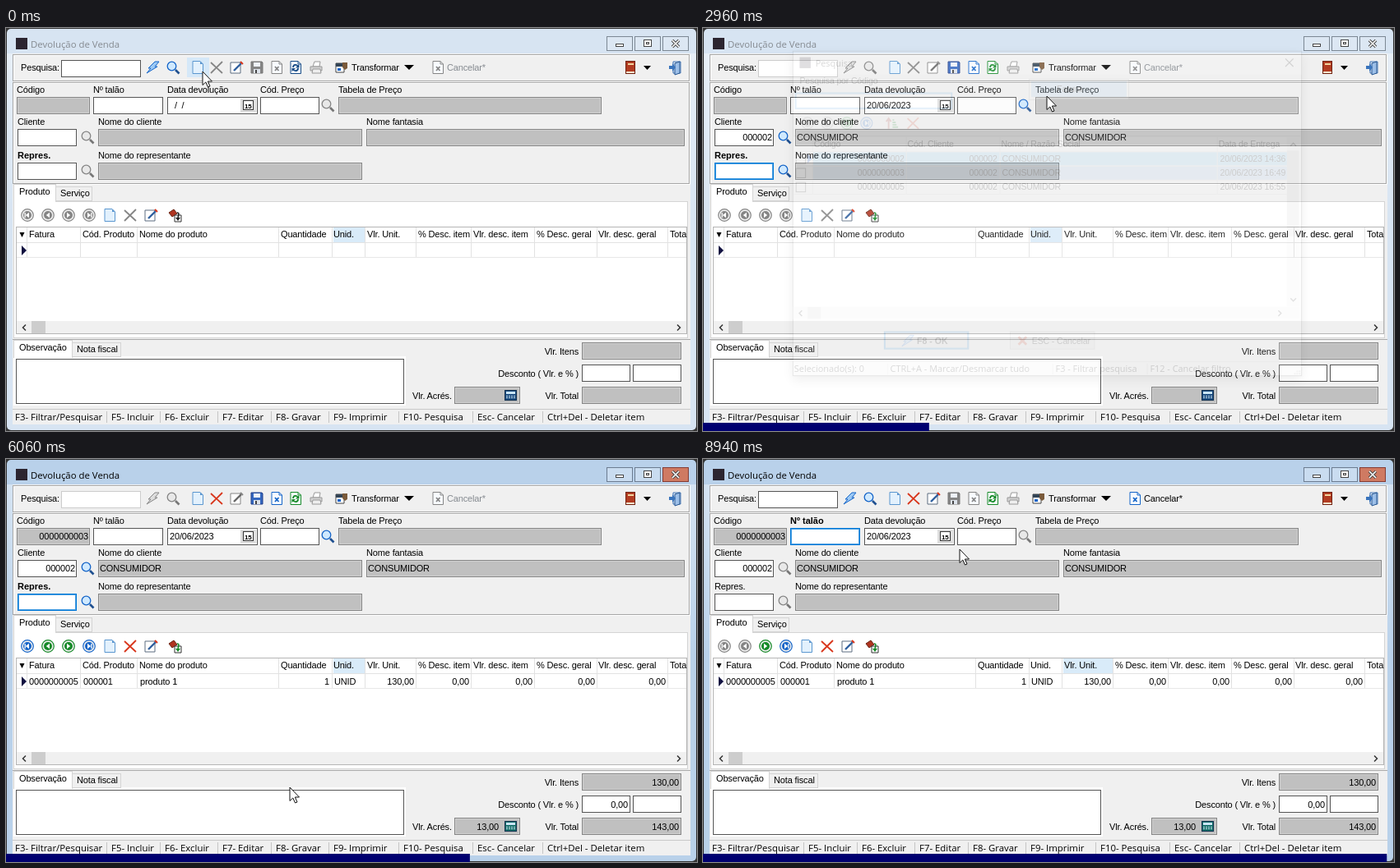
An HTML page for the animation above (9.02 s loop, 840x491 px).

```html
<!DOCTYPE html>
<html lang="pt">
<head>
<meta charset="utf-8">
<title>Devolução de Venda</title>
<style>
html, body { margin: 0; width: 100%; height: 100%; overflow: hidden; background: #f0f0f0; }
svg { display: block; width: 100%; height: 100%; }
text { font: 11px "Liberation Sans", sans-serif; letter-spacing: -.15px; fill: #000; white-space: pre; }
.b { font-weight: bold; letter-spacing: 0; }
.e { text-anchor: end; }
.ui { font: 11.4px "Open Sans", sans-serif; letter-spacing: 0; }
.dim { fill: #858a90; }
#press { mix-blend-mode: multiply; }
</style>
</head>
<body>
<svg id="stage" viewBox="0 0 840 491"></svg>
<script>
const LOOP = 9020;
const NEW = 310, MENU = 1660, PICK = 2870, OPEN = 2920, CHECK = 4150, OK = 5660,
      LOADED = 5820, FOCUS = 6600, SAVE = 8460;
const GREY = '#858585', BLUE = '#1464c8', RED = '#d8361c', GREEN = '#168a28', FACE = '#f0f0f0';

// Drawing helpers
const rect = (x, y, w, h, fill, stroke) => stroke
  ? `<rect x="${x + .5}" y="${y + .5}" width="${w - 1}" height="${h - 1}" fill="${fill}" stroke="${stroke}"/>`
  : `<rect x="${x}" y="${y}" width="${w}" height="${h}" fill="${fill}"/>`;
const text = (x, y, s, cls = '') => `<text x="${x}" y="${y + 4}" class="${cls}">${s}</text>`;
const path = (d, fill, stroke = 'none', width = 1) =>
  `<path d="${d}" fill="${fill}" stroke="${stroke}" stroke-width="${width}"/>`;
const line = (d, colour, width = 1) => path(d, 'none', colour, width);
const hline = (x, y, w, colour) => rect(x, y, w, 1, colour);
const vline = (x, y, h, colour) => rect(x, y, 1, h, colour);
const at = (x, y, s) => `<g transform="translate(${x} ${y})">${s}</g>`;
const each = (list, draw) => list.map(draw).join('');

// Timed visibility
const on = (spans, s) => `<g data-on='${JSON.stringify(spans)}'>${s}</g>`;
const off = (spans, s) => `<g data-off='${JSON.stringify(spans)}'>${s}</g>`;
const swap = (spans, yes, no) => on(spans, yes) + off(spans, no);
const lit = (spans, x, y, icon, colour = BLUE) => at(x, y, swap(spans, icon(colour), icon(GREY)));
const blink = (from, to) => {
  const spans = [];
  for (let t = from; t < to; t += 1060) spans.push([t, Math.min(t + 530, to)]);
  return spans;
};

const ALWAYS = [[0, LOOP]], IDLE = [[0, NEW], [SAVE, LOOP]], EDITING = [[NEW, SAVE]],
      FILLED = [[NEW, LOOP]], DATA = [[LOADED, LOOP]],
      ACTIVE = [[NEW, PICK], [LOADED, LOOP]], REPRES = [[NEW, 3100], [LOADED, FOCUS]];

// Icons, centred on the origin
const page = c => path('M-6-7.5H3L6.5-4V7.5H-6Z', '#f8fbff', c) + line('M3-7.5V-4H6.5', c);
const newDoc = () => path('M-6-7.5H3L6.5-4V7.5H-6Z', '#e3f1fd', '#5a96cf') + path('M3-7.5V-4H6.5Z', '#5a96cf');
const cross = c => line('M-7-6L7 7M7-7L-7 7', c, 1.8);
const edit = c => path('M-7-6H5V7H-7Z', '#fff', c === GREY ? GREY : '#5c6c80') +
  line('M-3 4L6-5', c === GREY ? '#666' : '#2f5f9e', 2.4) + line('M5-7L8-4', c === GREY ? GREY : RED, 2);
const floppy = c => path('M-7-7H6L7-6V7H-7Z', c, c === GREY ? '#777' : '#203c88') +
  rect(-4, -6, 8, 5, '#eef2f8') + rect(-4, 2, 8, 5, '#dce2ea') + rect(-2, 3, 2, 4, '#444');
const docX = c => page(c) + line('M-2-1L2.5 4M2.5-1L-2 4', c, 1.8);
const refresh = c => page(c) + line('M-3 0C-3-4 2-4 3-1M3 1C3 5-2 5-3 2', c, 1.8) +
  path('M4.5-4V.5H0ZM-4.5 5V1H0Z', c);
const printer = () => path('M-4-1L-2-7H5L4-1Z', '#fff', '#999') + path('M-7-1H7V4H-7Z', '#d3d3d3', '#999') +
  path('M-4 2H5L6 7H-5Z', '#eee', '#999');
const bolt = c => path('M3-7H8L3-1H6L-7 7L-2 1H-5Z', c === GREY ? '#ddd' : '#9cc9f5', c);
const lens = c => line('M3 3L7.5 7.5', c === GREY ? '#777' : '#205090', 2.6) +
  `<circle cx="-1.5" cy="-1.5" r="5.3" fill="${c === GREY ? '#e8e8e8' : '#cfe9ff'}" stroke="${c}" stroke-width="1.3"/>`;
const nav = (kind, c) => {
  const back = kind < 2 ? -1 : 1, bar = kind % 3 === 0;
  return `<circle r="7.3" fill="#eee" stroke="${c}" stroke-width="1.2"/><circle r="5" fill="${c}"/>` +
    path(`M${-2 * back}-3.2L${2.2 * back} 0L${-2 * back} 3.2Z`, '#fff') +
    (bar ? rect(back < 0 ? -3.5 : 2.3, -3, 1.3, 6, '#fff') : '');
};
const navBar = (x, y, step, backSpans, nextSpans) => each([0, 1, 2, 3], i =>
  lit(i < 2 ? backSpans : nextSpans, x + i * step, y, c => nav(i, c), i % 3 ? GREEN : BLUE));
const transfer = c => path('M-8-4L-2-8L2-3L-4 1Z', '#b03420', '#621') + path('M-1-1H7V7H-1Z', '#fff', '#333') +
  path('M0 2H6L3 6Z', c) + line('M2-4C5-4 4-2 3 2', c, 1.6);
const mark = (x, y) => rect(x, y, 14, 14, '#2c2530');
const thumb = (x, y, w, h) => rect(x, y, w, h, '#cdcdcd');
const chevron = (x, y, a) => `<path d="M-2-3.5L1.5 0L-2 3.5" transform="translate(${x} ${y}) rotate(${a})" fill="none" stroke="#333" stroke-width="1.5"/>`;

// Form parts
const field = (x, y, w, h = 21) => rect(x, y, w, h, '#fff', '#555');
const locked = (x, y, w, h = 21) => rect(x, y, w, h, '#c0c0c0', '#858585') +
  rect(x + 1, y + 1, w - 2, h - 2, 'none', '#d0d0d0');
const focusBox = (x, y, w) => rect(x, y, w, 21, '#fff', '#0078d7') + rect(x + 1, y + 1, w - 2, 19, 'none', '#4a9fe2');
const caret = (x, y, from, to) => on(blink(from, to), vline(x, y, 14, '#000'));
const group = (x, y, w, h) => rect(x + 1, y + 1, w, h, 'none', '#fff') + rect(x, y, w, h, 'none', '#a6a6a6');

function frame() {
  const shell = fill => `<rect x="1" y="1" width="838" height="489" rx="5" fill="${fill}"/>`;
  const button = (x, fill, stroke) => rect(x, 10, 32, 18, fill, stroke);
  const shine = '<defs><linearGradient id="shine" x2="0" y2="1"><stop stop-color="#fff" stop-opacity=".4"/>' +
    '<stop offset="1" stop-color="#fff" stop-opacity="0"/></linearGradient></defs>';
  return shine + rect(0, 0, 840, 491, '#333') + swap(ACTIVE, shell('#b9d1ea'), shell('#d7e4f2')) +
    rect(1, 31, 838, 210, 'url(#shine)') + rect(8, 31, 824, 452, FACE) + mark(12, 12) +
    swap(ACTIVE, text(30, 20, 'Devolução de Venda', 'ui'), text(30, 20, 'Devolução de Venda', 'ui dim')) +
    swap(ACTIVE, button(730, '#c9dcf0', '#6c7c90') + button(764, '#c9dcf0', '#6c7c90') + button(798, '#cf7a62', '#843c34'),
      each([730, 764, 798], x => button(x, '#dce7f3', '#7c8894'))) +
    rect(741, 19, 10, 4, '#fff', '#444') + rect(775, 14, 10, 9, '#fff', '#444') + rect(778, 17, 4, 3, 'none', '#444') +
    line('M810 15L818 23M818 15L810 23', '#444', 3.5) + line('M810 15L818 23M818 15L810 23', '#fff', 1.6);
}

function toolbar() {
  return group(8, 32, 823, 33) + text(18, 48, 'Pesquisa:') +
    swap(IDLE, field(67, 39, 97), rect(67, 39, 97, 21, '#fff', '#ccc')) +
    lit(IDLE, 178, 48, bolt) + lit(IDLE, 203, 48, lens) +
    on([[0, 560]], rect(220, 36, 27, 24, '#d5e8f8')) + at(233, 48, newDoc()) +
    lit(DATA, 256, 48, cross, RED) + lit(IDLE, 280, 48, edit) +
    on([[8250, 8640]], rect(292, 36, 26, 24, '#d5e8f8')) +
    lit(EDITING, 305, 48, floppy, '#3568c0') + lit(EDITING, 329, 48, docX) +
    at(352, 48, swap([[0, PICK]], refresh('#164a86'), refresh(GREEN))) + at(377, 48, printer()) +
    on([[1500, 2400]], rect(395, 36, 103, 25, '#cfe5f8')) +
    at(408, 48, path('M-7-5H3V6H-7Z', '#fff', '#444') + rect(-7, -5, 10, 4, '#345') +
      path('M1-6H7V1L4 3L1 0Z', '#7a5a3a') + rect(-5, 1, 4, 3, BLUE)) +
    text(420, 48, 'Transformar') + path('M484 45H496L490 51Z', '#000') +
    lit([[SAVE, LOOP]], 525, 48, docX) +
    swap([[SAVE, LOOP]], text(536, 48, 'Cancelar*'), text(536, 48, 'Cancelar*', 'dim')) +
    rect(753, 40, 12, 16, '#b23c22', '#70220f') + rect(756, 43, 7, 2, '#f3d6a0') + rect(754, 53, 10, 2, '#f4e8d0') +
    path('M775 46H784L779.5 51Z', '#000') +
    path('M811 41H820V55H811Z', '#e5effa', '#3d70b2') + path('M813 43L819 41V55L813 57Z', '#9dbfe8', '#285690') +
    path('M806 46H810V43L814 48L810 53V50H806Z', '#3a74bc');
}

function header() {
  const consumer = on(FILLED, text(114, 133, 'CONSUMIDOR') + text(440, 133, 'CONSUMIDOR') + text(84, 133, '000002', 'e'));
  return group(8, 66, 823, 124) +
    text(13, 75, 'Código') + locked(13, 84, 89) + on(DATA, text(100, 94, '0000000003', 'e')) +
    swap([[FOCUS, LOOP]], text(106, 75, 'Nº talão', 'b') + focusBox(106, 84, 85), text(106, 75, 'Nº talão') + field(106, 84, 85)) +
    caret(109, 87, FOCUS, SAVE) +
    text(196, 75, 'Data devolução') + field(196, 84, 110) +
    swap(FILLED, text(199, 94, '20/06/2023'), text(202, 94, ' /  /')) +
    rect(285, 86, 19, 17, '#ddd') + rect(288, 88, 13, 12, '#fff', '#333') +
    `<text x="290" y="98" style="font-size:8px;font-weight:bold">15</text>` +
    text(309, 75, 'Cód. Preço') + field(309, 84, 72) + lit(EDITING, 391, 94, lens) +
    text(404, 75, 'Tabela de Preço') + locked(404, 84, 320) +
    text(14, 114, 'Cliente') + field(14, 123, 72) + lit(EDITING, 99, 133, lens) +
    text(112, 114, 'Nome do cliente') + locked(112, 123, 321) +
    text(438, 114, 'Nome fantasia') + locked(438, 123, 387) + consumer +
    swap([[0, FOCUS]], text(14, 155, 'Repres.', 'b'), text(14, 155, 'Repres.')) +
    swap(REPRES, focusBox(14, 164, 72), field(14, 164, 72)) + caret(17, 167, NEW, OPEN) +
    lit(EDITING, 99, 174, lens) + text(112, 155, 'Nome do representante') + locked(112, 164, 321);
}

function tabs(y, first, second, split, end) {
  return rect(60, y + 3, end - 60, 18, FACE, '#d4d4d4') + rect(9, y, split - 9, 22, '#fff', '#d4d4d4') +
    rect(10, y + 19, split - 11, 4, '#fff') + text(16, y + 9, first) + text(split + 5, y + 11, second);
}

function products() {
  const columns = [[26, 'Fatura', 28], [91, 'Cód. Produto', 93], [160, 'Nome do produto', 162], [332, 'Quantidade', 334],
    [397, 'Unid.', 398], [437, 'Vlr. Unit.', 439], [499, '% Desc. item', 501], [566, 'Vlr. desc. item', 568],
    [643, '% Desc. geral', 645], [719, 'Vlr. desc. geral', 720], [805, 'Tota', 807]];
  const cells = [[393, '1'], [496, '130,00'], [563, '0,00'], [640, '0,00'], [716, '0,00'], [802, '0,00']];
  return rect(9, 211, 820, 167, '#fff', '#d4d4d4') + tabs(190, 'Produto', 'Serviço', 61, 105) +
    navBar(26, 228, 25, [[LOADED, SAVE]], DATA) + at(126, 228, newDoc()) + lit(DATA, 151, 228, cross, RED) +
    at(176, 228, edit(BLUE)) + at(206, 229, swap([[0, PICK]], transfer('#222'), transfer(GREEN))) +
    rect(12, 242, 816, 131, '#fff', '#b5b5b5') +
    swap([[0, 7950]], rect(398, 243, 39, 18, '#d9ebf9'), rect(438, 243, 61, 18, '#d9ebf9')) +
    hline(13, 261, 814, '#e2e2e2') + hline(13, 279, 814, '#e8e8e8') +
    each(columns, ([x, s, tx]) => vline(x - 1, 243, 36, '#e2e2e2') + text(tx, 251, s)) +
    path('M16.5 249H22.5L19.5 255Z', '#000') + path('M19 265V277L25 271Z', '#101040') +
    on(DATA, text(28, 271, '0000000005') + text(94, 271, '000001') + text(163, 271, 'produto 1') + text(399, 271, 'UNID') +
      each(cells, ([x, s]) => text(x, 271, s, 'e'))) +
    rect(13, 357, 814, 15, FACE) + thumb(31, 357, 17, 15) + chevron(22, 365, 180) + chevron(818, 365, 0);
}

function totals() {
  const calc = fill => rect(606, 441, 15, 13, fill, '#12304e') + rect(608, 443, 11, 3, '#c8e4f4') +
    each([0, 1, 2, 3], i => rect(608 + i * 3, 448, 2, 1, '#c8e4f4') + rect(608 + i * 3, 450, 2, 1, '#c8e4f4'));
  const keys = [[11, 'F3- Filtrar/Pesquisar'], [128, 'F5- Incluir'], [193, 'F6- Excluir'], [263, 'F7- Editar'], [328, 'F8- Gravar'],
    [398, 'F9- Imprimir'], [483, 'F10- Pesquisa'], [573, 'Esc- Cancelar'], [658, 'Ctrl+Del - Deletar item']];
  return hline(8, 379, 824, '#aaa') + rect(9, 400, 477, 60, '#fff') + tabs(380, 'Observação', 'Nota fiscal', 81, 140) +
    rect(12, 403, 472, 55, '#fff', '#555') +
    text(696, 394, 'Vlr. Itens', 'e') + locked(700, 383, 121) +
    text(696, 421, 'Desconto ( Vlr. e % )', 'e') + field(700, 410, 59) + field(762, 410, 59) +
    text(494, 448, 'Vlr. Acrés.') + locked(545, 437, 80) + swap(DATA, calc('#16706a'), calc('#1c4c80')) +
    text(696, 448, 'Vlr. Total', 'e') + locked(700, 437, 121) +
    on(DATA, text(818, 394, '130,00', 'e') + text(756, 421, '0,00', 'e') + text(599, 448, '13,00', 'e') + text(818, 448, '143,00', 'e')) +
    hline(8, 464, 824, '#c8c8c8') +
    each(keys, ([x, s], i) => (i ? vline(x - 6, 467, 14, '#c5c5c5') : '') + text(x, 474, s, 'ui'));
}

function menu() {
  return on([[MENU - 20, PICK]], rect(518, 66, 3, 24, '#8a8a8a') + rect(400, 88, 118, 2, '#8a8a8a')) +
    `<g id="menu">${rect(396, 62, 122, 26, '#f2f2f2', '#bbb')}` +
    on([[2150, 3100]], rect(399, 65, 116, 19, '#a8d4f5')) + text(430, 74, 'Fatura') + '</g>';
}

function dialog() {
  const early = [[0, CHECK]], late = [[CHECK, LOOP]];
  const rows = ['2 14:36', '3 16:49', '5 16:55'];
  const checkbox = y => rect(99, y - 6, 13, 13, '#fff', '#333');
  const button = (x, fill, stroke) => rect(x, 376, 108, 23, fill, stroke);
  const shadow = '<rect x="95" y="24" width="647" height="414" opacity=".45" style="filter:blur(7px)"/>';
  return shadow + rect(95, 19, 647, 414, FACE, '#555') + rect(96, 20, 645, 29, '#fff') +
    mark(104, 27) + text(124, 35, 'Pesquisa', 'ui') + line('M721 29L731 39M731 29L721 39', '#222', 1.2) +
    hline(97, 57, 642, '#d2d2d2') + rect(102, 52, 100, 10, FACE) + text(104, 57, 'Pesquisa por Código') +
    swap(early, focusBox(98, 72, 200), rect(98, 72, 200, 21, '#fff', '#777')) +
    caret(101, 75, 3050, CHECK) + navBar(114, 111, 25, late, ALWAYS) +
    at(221, 111, line('M-4 7V-5M-7-2L-4-6L-1-2', '#b0342a', 2) + line('M1-4H3M1-1H5M1 2H6M1 5H8', GREEN, 2)) +
    at(248, 111, cross(RED)) +
    rect(96, 127, 644, 234, '#fff') + hline(96, 127, 644, '#b5b5b5') + hline(96, 147, 627, '#e2e2e2') +
    swap(early, rect(121, 148, 602, 17, '#87cefa'), rect(121, 184, 602, 17, '#87cefa')) + rect(121, 166, 602, 17, '#a6caf0') +
    each([120, 239, 358, 634], x => vline(x, 128, 73, '#e0e0e0')) +
    each([165, 183, 201], y => hline(97, y, 626, '#dcdcdc')) +
    text(122, 137, 'Código') + text(241, 137, 'Cód. Cliente') + text(360, 137, 'Nome / Razão Social') + text(636, 137, 'Data de Entrega') +
    each(rows, (row, i) => {
      const y = 156 + i * 18, [id, hour] = row.split(' ');
      return checkbox(y) + text(237, y, '000000000' + id, 'e') + text(355, y, '000002', 'e') +
        text(361, y, 'CONSUMIDOR') + text(638, y, '20/06/2023 ' + hour);
    }) +
    swap(early, path('M114 150V162L120 156Z', '#1258d8'),
      line('M101.5 192L104.5 195L110 188.5', '#222', 1.5) + line('M113.5 188L116 192L113.5 196M116.5 188L119 192L116.5 196', '#000', 1.3)) +
    rect(723, 128, 16, 217, FACE) + chevron(731, 138, -90) + chevron(731, 336, 90) +
    swap(early, thumb(723, 146, 15, 109), thumb(723, 219, 15, 109)) +
    rect(96, 345, 643, 15, FACE) + thumb(114, 345, 17, 15) + chevron(105, 353, 180) + chevron(714, 353, 0) +
    swap([[5250, LOOP]], button(211, '#e5f1fb', '#0078d7'), button(211, '#e1e1e1', '#0078d7') + rect(212, 377, 106, 21, 'none', '#0078d7')) +
    at(241, 388, bolt(BLUE)) + text(253, 388, 'F8 - OK', 'b') +
    button(371, '#e1e1e1', '#adadad') + line('M382 383L392 393M392 383L382 393', '#c8371c', 3) + text(399, 388, 'ESC - Cancelar') +
    hline(96, 414, 645, '#d0d0d0') + each([215, 425, 545], x => vline(x, 417, 14, '#c5c5c5')) +
    swap(early, text(97, 424, 'Selecionado(s): 0', 'ui'), text(97, 424, 'Selecionado(s): 1', 'ui')) +
    text(219, 424, 'CTRL+A - Marcar/Desmarcar tudo', 'ui') + text(429, 424, 'F3 - Filtrar pesquisa', 'ui') +
    text(549, 424, 'F12 - Cancelar filtro', 'ui') +
    each([0, 1, 2], i => rect(738 - i * 3, 429, 2, 2, '#aaa') + (i < 2 ? rect(738 - i * 3, 426, 2, 2, '#aaa') : ''));
}

const TYPING = [[6720, 7620]];
const pointer = swap(TYPING, line('M-3-8C-1-8 0-7 0-6V6C0 7-1 8-3 8M3-8C1-8 0-7 0-6M0 6C0 7 1 8 3 8', '#333', 1.2),
  path('M0 0V16.5L3.8 13L6.5 19L9 18L6.4 12H11.5Z', '#fff', '#111'));

const stage = document.getElementById('stage');
stage.innerHTML = frame() + toolbar() + header() + products() + totals() + menu() +
  `<g id="dialog">${dialog()}</g><rect id="bar" y="481" height="10" fill="#000070"/>` +
  `<circle id="press" r="12.5" fill="#eeea30"/><g id="cursor">${pointer}</g>`;

const $ = id => document.getElementById(id);
const timed = [...stage.querySelectorAll('[data-on],[data-off]')].map(el => ({
  el, shown: 'on' in el.dataset, spans: JSON.parse(el.dataset.on || el.dataset.off)
}));

// Pointer stops: time, x, y
const stops = [[0, 239, 53], [560, 239, 53], [1560, 485, 44], [1880, 485, 44], [2400, 418, 83], [2960, 418, 83],
  [3450, 123, 222], [3750, 123, 222], [4020, 104, 189], [4300, 104, 189], [4700, 152, 140], [5400, 279, 388],
  [5780, 279, 388], [6720, 600, 447], [7560, 600, 447], [8290, 304, 45], [8560, 304, 45], [8900, 312, 110], [LOOP, 312, 110]];
const presses = [230, MENU, 2620, 4110, 5580, 6800, 8380];

const ramp = (t, from, length) => Math.min(1, Math.max(0, (t - from) / length));
const ease = p => p * p * (3 - 2 * p);

function pointerAt(t) {
  const i = Math.max(1, stops.findIndex(s => s[0] >= t));
  const [t0, x0, y0] = stops[i - 1], [t1, x1, y1] = stops[i];
  const p = ease(ramp(t, t0, t1 - t0));
  return [x0 + (x1 - x0) * p, y0 + (y1 - y0) * p].map(Math.round);
}

function draw(t) {
  for (const { el, shown, spans } of timed) {
    const inside = spans.some(([a, b]) => t >= a && t < b);
    el.style.display = inside === shown ? '' : 'none';
  }
  $('bar').setAttribute('width', 840 * t / LOOP);
  $('menu').setAttribute('opacity', ramp(t, MENU - 20, 150) * (1 - ramp(t, PICK, 100)));
  const open = ramp(t, OPEN, 220) * (1 - ramp(t, OK, 160));
  const scale = .95 + .05 * open;
  $('dialog').setAttribute('opacity', open);
  $('dialog').setAttribute('transform', `translate(418.5 226) scale(${scale}) translate(-418.5 -226)`);
  const [x, y] = pointerAt(t);
  $('cursor').setAttribute('transform', `translate(${x} ${y})`);
  $('press').setAttribute('cx', x - 1);
  $('press').setAttribute('cy', y + 1);
  const last = presses.filter(p => p <= t).pop();
  $('press').setAttribute('opacity', last === undefined ? 0 : .9 * (1 - ramp(t, last + 40, 230)));
}

const start = performance.now();
function tick(now) {
  const t = Math.max(0, now - start) % LOOP;
  draw(t < 80 ? 0 : 80 + 77.6 * Math.max(0, Math.floor((t - 80) / 77.6 + .3)));
  requestAnimationFrame(tick);
}
draw(0);
requestAnimationFrame(tick);
</script>
</body>
</html>
```
